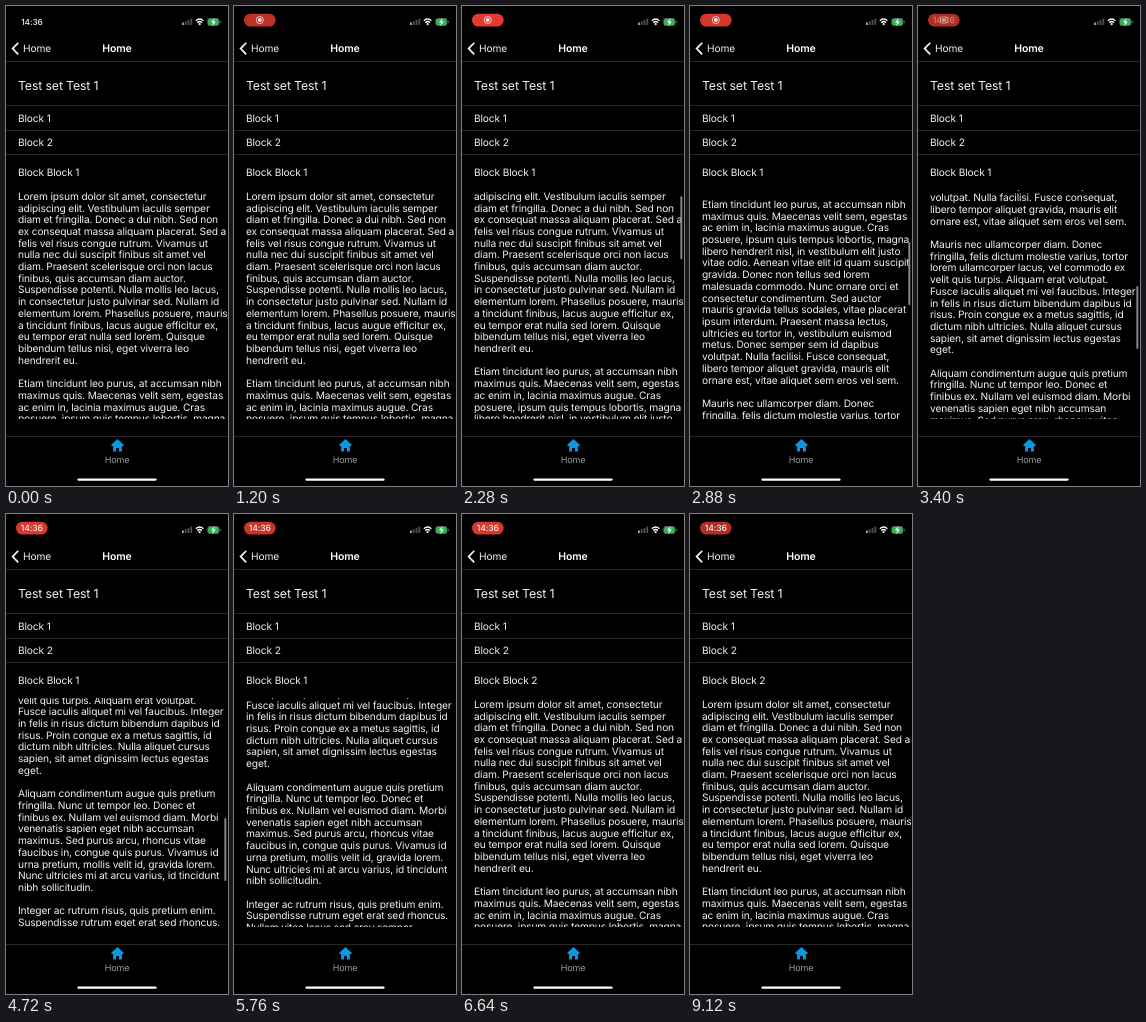
Recreate the animation shown at these times as an HTML page. Size 222 by 480 pixels, loop 9.16 s.

```html
<!DOCTYPE html>
<html lang="en">
<head>
<meta charset="utf-8">
<title>Scrolling block</title>
<style>
  html, body { margin: 0; width: 100%; height: 100%; overflow: hidden; background: #000; }
  svg { display: block; width: 222px; height: 480px; }
  text { font-family: Inter, Roboto, sans-serif; font-size: 10.2px; letter-spacing: -.014em; fill: #f0f0f2;
    text-rendering: geometricPrecision; white-space: pre; }
  .mid { text-anchor: middle; }
  .rule { stroke: #262628; stroke-width: 1; }
</style>
</head>
<body>
<svg viewBox="0 0 222 480">
  <clipPath id="view"><rect y="184" width="222" height="229"/></clipPath>

  <!-- status bar -->
  <text id="clock" class="mid" x="26" y="19.2" style="font-size:8.4px;font-weight:500">14:36</text>
  <g id="pill">
    <rect id="red" x="10" y="7.7" width="31.6" height="12.8" rx="6.4" fill="#e83c32"/>
    <g id="rec" fill="#f6e4e2">
      <circle cx="25.8" cy="14.1" r="3.6" fill="none" stroke="#f6e4e2" stroke-width=".8"/>
      <circle cx="25.8" cy="14.1" r="2"/>
    </g>
    <text id="pillTime" class="mid" x="25.8" y="17.2" style="font-size:8.7px;font-weight:500">14:36</text>
  </g>
  <g fill="#505052">
    <rect x="176" y="16.5" width="1.8" height="2.5" fill="#aaa"/>
    <rect x="178.8" y="15.2" width="1.8" height="3.8"/>
    <rect x="181.6" y="13.9" width="1.8" height="5.1"/>
    <rect x="184.4" y="12.6" width="1.8" height="6.4"/>
  </g>
  <g fill="none" stroke="#fff" stroke-width="1.4">
    <path d="M189.8 14.8q3.8-3.4 7.6 0M191.3 16.6q2.3-2 4.6 0"/>
    <circle cx="193.6" cy="18.2" r=".4"/>
  </g>
  <rect x="201.8" y="12.5" width="11" height="7" rx="2" fill="#2fb552" stroke="#6f7771" stroke-width=".7"/>
  <rect x="213.6" y="14.7" width="1" height="2.6" rx=".5" fill="#777"/>
  <path d="M208.6 11.9l-3.6 4.6h2.2l-1 3.8 3.7-4.9h-2.3z" fill="#fff"/>

  <!-- header -->
  <path d="M12.2 36.9L6.6 42.6l5.6 5.7" fill="none" stroke="#f4f4f5" stroke-width="1.7"/>
  <text x="17" y="46.4">Home</text>
  <text class="mid" x="111" y="46.4" style="font-size:10.5px;font-weight:600;fill:#fff">Home</text>
  <path class="rule" d="M0 55.5H222M0 99.5H222M0 124.5H222M0 148.5H222M0 430.5H222"/>

  <!-- list -->
  <text x="12" y="84.4" style="font-size:12.4px">Test set Test 1</text>
  <text x="12" y="115.7">Block 1</text>
  <g id="row">
    <rect y="125" width="222" height="23" fill="#000"/>
    <text x="12" y="139.7">Block 2</text>
  </g>
  <text id="heading" x="12" y="170.2">Block Block 1</text>

  <g clip-path="url(#view)"><g id="body"></g></g>
  <rect id="thumb" x="218.4" width="1.9" height="63" rx=".95" fill="#8c8c8e"/>

  <!-- tab bar -->
  <path d="M111.5 433l6.5 5.9-.9 1h-1.2v5.6h-3v-3.6h-2.8v3.6h-3v-5.6h-1.2l-.9-1z" fill="#0f96e0"/>
  <text class="mid" x="111" y="457" style="font-size:9px;fill:#98989a">Home</text>
  <rect x="71.4" y="472.4" width="79.2" height="2.4" rx="1.2" fill="#fff"/>
</svg>
<script>
const LOOP = 9160, LINE = 11.71;
const COPY = `Lorem ipsum dolor sit amet, consectetur
adipiscing elit. Vestibulum iaculis semper
diam et fringilla. Donec a dui nibh. Sed non
ex consequat massa aliquam placerat. Sed a
felis vel risus congue rutrum. Vivamus ut
nulla nec dui suscipit finibus sit amet vel
diam. Praesent scelerisque orci non lacus
finibus, quis accumsan diam auctor.
Suspendisse potenti. Nulla mollis leo lacus,
in consectetur justo pulvinar sed. Nullam id
elementum lorem. Phasellus posuere, mauris
a tincidunt finibus, lacus augue efficitur ex,
eu tempor erat nulla sed lorem. Quisque
bibendum tellus nisi, eget viverra leo
hendrerit eu.

Etiam tincidunt leo purus, at accumsan nibh
maximus quis. Maecenas velit sem, egestas
ac enim in, lacinia maximus augue. Cras
posuere, ipsum quis tempus lobortis, magna
libero hendrerit nisl, in vestibulum elit justo
vitae odio. Aenean vitae elit id quam suscipit
gravida. Donec non tellus sed lorem
malesuada commodo. Nunc ornare orci et
consectetur condimentum. Sed auctor
mauris gravida tellus sodales, vitae placerat
ipsum interdum. Praesent massa lectus,
ultricies eu tortor in, vestibulum euismod
metus. Donec semper sem id dapibus
volutpat. Nulla facilisi. Fusce consequat,
libero tempor aliquet gravida, mauris elit
ornare est, vitae aliquet sem eros vel sem.

Mauris nec ullamcorper diam. Donec
fringilla, felis dictum molestie varius, tortor
lorem ullamcorper lacus, vel commodo ex
velit quis turpis. Aliquam erat volutpat.
Fusce iaculis aliquet mi vel faucibus. Integer
in felis in risus dictum bibendum dapibus id
risus. Proin congue ex a metus sagittis, id
dictum nibh ultricies. Nulla aliquet cursus
sapien, sit amet dignissim lectus egestas
eget.

Aliquam condimentum augue quis pretium
fringilla. Nunc ut tempor leo. Donec et
finibus ex. Nullam vel euismod diam. Morbi
venenatis sapien eget nibh accumsan
maximus. Sed purus arcu, rhoncus vitae
faucibus in, congue quis purus. Vivamus id
urna pretium, mollis velit id, gravida lorem.
Nunc ultricies mi at arcu varius, id tincidunt
nibh sollicitudin.

Integer ac rutrum risus, quis pretium enim.
Suspendisse rutrum eget erat sed rhoncus.
Nullam vitae lacus sed arcu semper`;

const $ = id => document.getElementById(id);
const ramp = (t, a, b) => Math.min(1, Math.max(0, (t - a) / (b - a)));
const fade = (id, v) => $(id).setAttribute('opacity', v);

$('body').innerHTML = COPY.split('\n')
  .map((s, i) => `<text x="12" y="${193.8 + i * LINE}">${s}</text>`).join('');

// slow drag, flick, then exponential deceleration
function scrollAt(t) {
  if (t < 2200 || t >= 6480) return 0;
  if (t < 2280) return 11.7 * (t - 2200) / 80;
  if (t < 2720) return 11.7 + 77.5 * ((t - 2280) / 440) ** 3.7;
  return 433.6 - 254.8 * Math.exp((2880 - t) / 530);
}

function draw(now) {
  const t = now % LOOP, y = scrollAt(t);
  $('body').setAttribute('transform', `translate(0 ${-y})`);
  $('thumb').setAttribute('y', 187 + y * .275);
  fade('thumb', ramp(t, 2180, 2240) - ramp(t, 5100, 5400));

  const shown = ramp(t, 40, 300), time = ramp(t, 3340, 3480);
  fade('clock', 1 - shown);
  fade('pill', shown);
  fade('red', .88 - .12 * Math.cos((t - 9120) / 1900 * 2 * Math.PI));
  fade('rec', 1 - time);
  fade('pillTime', time);

  fade('row', 1 - .8 * (ramp(t, 6240, 6340) - ramp(t, 6400, 6620)));
  $('heading').textContent = 'Block Block ' + (t < 6480 ? 1 : 2);
}

const start = performance.now();
(function tick() {
  draw(performance.now() - start);
  requestAnimationFrame(tick);
})();
</script>
</body>
</html>
```
